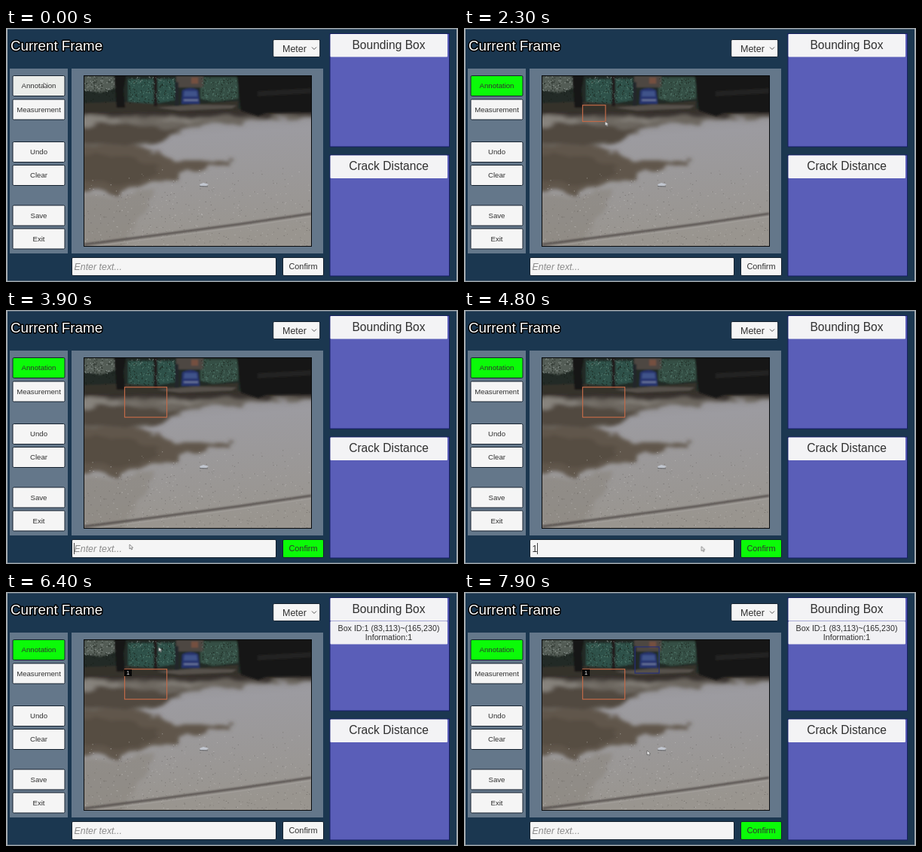
These frames come from a looping animation (600 px wide and 338 px high, 8 s). An HTML page:

```html
<!DOCTYPE html>
<html lang="en">
<head>
<meta charset="utf-8">
<title>Frame annotation</title>
<style>
  html, body { margin: 0; width: 100%; height: 100%; overflow: hidden; background: #1b3750; }
  svg { display: block; width: 100vw; height: 100vh; }
  text { font-family: "Liberation Sans", Arial, sans-serif; fill: #303030; }
  .mid { text-anchor: middle; }
  .btn { fill: #f5f5f5; stroke: #14212e; stroke-width: 1; }
  .head { font-size: 15.6px; }
  .entry { font-size: 10.7px; }
  .drag { fill: none; stroke-width: 1.2; }

  #cursor, #first, #second { animation: 8s linear infinite; }
  #cursor { animation-name: move; }
  #first { animation-name: drag-first; }
  #second { animation-name: drag-second; }
  #annotate, #confirm, #hint, #typed, #caret, .result { animation: 8s step-end infinite; }
  #annotate { animation-name: annotate; }
  #confirm { animation-name: confirm; }
  #hint { animation-name: hint; }
  #typed { animation-name: typed; }
  #caret { animation-name: caret; }
  .result { animation-name: result; }

  @keyframes move {
    0%, 4.5% { transform: translate(50px, 73px); }
    11% { transform: translate(150px, 102px); }
    17%, 23.75% { transform: translate(157px, 103px); }
    33%, 34.5% { transform: translate(213px, 142px); }
    38.75% { transform: translate(176px, 228px); }
    44%, 56% { transform: translate(164px, 312px); }
    62%, 65.5% { transform: translate(390px, 316px); }
    71.5%, 74.5% { transform: translate(66px, 75px); }
    81%, 82.5% { transform: translate(227px, 73px); }
    88.75% { transform: translate(245px, 101px); }
    91%, 93% { transform: translate(259px, 107px); }
    98.75%, 100% { transform: translate(243px, 211px); }
  }
  @keyframes drag-first {
    0%, 23.75% { width: 0; height: 0; }
    33%, 100% { width: 56px; height: 40px; }
  }
  @keyframes drag-second {
    0%, 82.5% { width: 0; height: 0; }
    88.75% { width: 18px; height: 29px; }
    91%, 100% { width: 32px; height: 35px; }
  }
  @keyframes annotate {
    0%, 70% { fill: #ebedea; }
    4.4%, 74%, 100% { fill: #0bfb08; }
    64.5% { fill: #f5f5f5; }
  }
  @keyframes confirm {
    0%, 74% { fill: #f5f5f5; }
    34%, 92.5%, 100% { fill: #0bfb08; }
    64.5% { fill: #e9e9e9; }
  }
  @keyframes hint { 0%, 64.5%, 100% { opacity: 1; } 54% { opacity: 0; } }
  @keyframes typed { 0%, 64.5%, 100% { opacity: 0; } 54% { opacity: 1; } }
  @keyframes caret {
    0%, 52.5%, 61.5%, 100% { opacity: 0; transform: none; }
    46% { opacity: 1; transform: none; }
    54% { opacity: 1; transform: translateX(7px); }
  }
  @keyframes result { 0% { opacity: 0; } 64.5%, 100% { opacity: 1; } }
</style>
</head>
<body>
<svg viewBox="0 0 600 338" preserveAspectRatio="none">
  <defs>
    <clipPath id="view"><rect x="104" y="64" width="301" height="226"/></clipPath>
    <linearGradient id="ground" x1="0" y1="0" x2=".1" y2="1">
      <stop offset=".2" stop-color="#8f8d8f"/>
      <stop offset=".4" stop-color="#9c9ba0"/>
      <stop offset="1" stop-color="#99958f"/>
    </linearGradient>
    <filter id="dapple" x="-10%" y="-10%" width="120%" height="120%">
      <feTurbulence type="fractalNoise" baseFrequency=".03 .09" numOctaves="2" seed="4"/>
      <feDisplacementMap in="SourceGraphic" scale="18" xChannelSelector="R" yChannelSelector="G"/>
      <feGaussianBlur stdDeviation="2.6"/>
    </filter>
    <filter id="haze" x="-20%" y="-20%" width="140%" height="140%"><feGaussianBlur stdDeviation=".9"/></filter>
  </defs>

  <rect width="600" height="338" fill="#a6acb0"/>
  <rect x="2" y="1.5" width="596" height="335" fill="#1b3750"/>
  <rect x="5" y="54" width="77" height="246" fill="#64778a"/>
  <rect x="87" y="54" width="334" height="246" fill="#64778a"/>

  <text x="6" y="29.7" font-size="18.8" style="fill:#fff;stroke:#000;stroke-width:3;paint-order:stroke;stroke-linejoin:round">Current Frame</text>

  <g clip-path="url(#view)">
    <rect x="104" y="64" width="301" height="226" fill="url(#ground)"/>
    <g filter="url(#dapple)">
      <path d="M85 95H425V119L330 123L250 131L222 143L188 158H85Z" fill="#6c665f"/>
      <path d="M85 95H425V115L345 119L300 115L230 118L150 116L85 119Z" fill="#37322d"/>
      <path d="M85 132L150 128L215 133L240 128L222 142L195 153L160 156L85 150Z" fill="#514940"/>
      <path d="M85 156L170 157L202 167L224 177L300 177V185L240 189L222 204L170 212L142 221L85 215Z" fill="#61574c"/>
      <path d="M85 172L150 168L205 182L190 199L145 207L85 201Z" fill="#574d42"/>
      <path d="M85 121L145 121L180 125L85 129Z" fill="#87837d"/>
      <path d="M190 123L290 119L240 126Z" fill="#87837d"/>
      <path d="M85 224L142 226L200 214L150 300H85Z" fill="#8a857f" opacity=".6"/>
    </g>
    <g filter="url(#haze)">
      <path d="M100 60H315V108H100Z" fill="#222b26"/>
      <path d="M104 64H145V80L125 86L104 82Z" fill="#525c55"/>
      <path d="M162 68H224V96L195 101L162 98Z" fill="#2f5149"/>
      <path d="M258 66H308V94L275 98L258 94Z" fill="#365044"/>
      <path d="M226 64H262V79H226Z" fill="#4d4643"/>
      <path d="M246 66H255V74H246Z" fill="#75503f"/>
      <path d="M104 100L150 98L230 103L308 97V110L230 111L104 112Z" fill="#35312c"/>
      <path d="M200 106L250 102L306 103L300 107L230 110Z" fill="#56514b"/>
      <path d="M143 60H160L156 82L158 106H147Z" fill="#161412"/>
      <path d="M196 60H201V104H196Z" fill="#221f1a"/>
      <path d="M224 72H229V104H224Z" fill="#22282a"/>
      <path d="M234 83Q245 77 255 83L257 101H233Z" fill="#28366f"/>
      <path d="M237 84H253L254 91H236Z" fill="#40538a"/>
      <path d="M236 95H255V97H236Z" fill="#6d789f"/>
      <path d="M306 60H410V112L345 113L335 117L312 110Z" fill="#151413"/>
      <path d="M334 84L405 80V87L334 91Z" fill="#242321"/>
    </g>
    <path id="sky" stroke="#a3aca8" stroke-width="1.5" opacity=".6"/>
    <path id="leaves" stroke="#5f8a7c" stroke-width="1.4" opacity=".6"/>
    <path id="gaps" stroke="#182019" stroke-width="1.6" opacity=".7"/>
    <path id="grit-dark" stroke="#605c59" stroke-width="1" opacity=".5"/>
    <path id="grit-light" stroke="#cbc9c7" stroke-width="1" opacity=".55"/>
    <path d="M104 288L205 275L310 261L405 247" fill="none" stroke="#514b48" stroke-width="2.4" filter="url(#haze)"/>
    <path d="M104 292L205 279L310 265L405 251" fill="none" stroke="#aaa6a2" stroke-width="1.6" opacity=".5"/>
    <path d="M257 208L262 206L269 208L266 210L258 210Z" fill="#c0c5ce"/>
    <path d="M257 210.5L268 211" stroke="#696b70" stroke-width="1"/>
  </g>
  <rect x="103.5" y="63.5" width="302" height="227" fill="none" stroke="#080a0c"/>

  <rect id="first" class="drag" x="157.5" y="102.7" stroke="#c06a48"/>
  <rect id="second" class="drag" x="227" y="73" stroke="#263078"/>
  <g class="result">
    <rect x="157" y="103" width="10" height="9" fill="#080808"/>
    <text class="mid" x="162" y="110" font-size="7" style="fill:#fff">1</text>
  </g>

  <g id="buttons"></g>

  <rect class="btn" x="354.7" y="15.5" width="62" height="23" rx="1.5"/>
  <text x="367" y="31.5" font-size="12.5">Meter</text>
  <path d="M406 25.5L409 28.5L412 25.5" fill="none" stroke="#555" stroke-width="1"/>

  <rect class="btn" x="87.5" y="305.5" width="271" height="24" rx="1.5"/>
  <text id="hint" x="90.5" y="322" font-size="12.4" font-style="italic" style="fill:#8b8b8b">Enter text...</text>
  <text id="typed" x="90.5" y="322" font-size="12.4">1</text>
  <rect id="caret" x="90" y="310" width="1" height="15" fill="#444"/>

  <g id="panels"></g>

  <g class="result">
    <rect x="430.5" y="39" width="155.5" height="30.5" rx="1" fill="#f1f1f4"/>
    <text class="mid entry" x="508" y="52">Box ID:1 (83,113)~(165,230)</text>
    <text class="mid entry" x="508" y="64">Information:1</text>
  </g>

  <path id="cursor" d="M0 0V6L1.5 4.8L2.7 7L3.7 6.4L2.7 4.4L4.6 4.2Z" fill="#f4f4f4" stroke="#4a4a4a" stroke-width=".6"/>
</svg>
<script>
  const $ = id => document.getElementById(id);

  const button = (label, x, y, w, h, size, id = '') => `
    <rect ${id && `id="${id}"`} class="btn" x="${x}" y="${y}" width="${w}" height="${h}" rx="1.5"/>
    <text class="mid" x="${x + w / 2}" y="${y + h / 2 + size * .36}" font-size="${size}">${label}</text>`;

  const side = [['Annotation', 63.5, 'annotate'], ['Measurement', 95], ['Undo', 151.5],
    ['Clear', 182.5], ['Save', 236], ['Exit', 267]];
  $('buttons').innerHTML =
    side.map(([label, y, id]) => button(label, 9, y, 69, 27, 9.6, id)).join('') +
    button('Confirm', 367.5, 305.5, 54, 24, 10.9, 'confirm');

  const panel = (title, y, h) => `
    <rect x="430" y="${y}" width="158.5" height="${h}" fill="#5a5eb8" stroke="#171f62" stroke-width="1"/>
    <rect x="430.5" y="${y + .5}" width="155.5" height="30.5" rx="1" fill="#f3f3f5"/>
    <text class="mid head" x="508" y="${y + 20.4}">${title}</text>`;
  $('panels').innerHTML = panel('Bounding Box', 7.5, 150.5) + panel('Crack Distance', 169, 161);

  // Seeded texture for the pavement and the foliage
  let seed = 11;
  const rand = () => (seed = seed * 16807 % 2147483647) / 2147483647;
  const specks = (count, x, y, w, h, bias = 1) => Array.from({ length: count }, () =>
    `M${(x + rand() * w).toFixed(1)} ${(y + rand() ** bias * h).toFixed(1)}h${(.5 + rand()).toFixed(1)}`).join('');
  const scatter = (id, ...areas) => $(id).setAttribute('d', areas.map(a => specks(...a)).join(''));
  scatter('grit-dark', [260, 104, 185, 301, 105, .6]);
  scatter('grit-light', [220, 104, 180, 301, 110, .6]);
  scatter('sky', [60, 104, 65, 40, 20], [20, 160, 65, 62, 8]);
  scatter('leaves', [130, 162, 66, 62, 32], [90, 259, 66, 46, 30]);
  scatter('gaps', [60, 104, 65, 40, 35], [110, 162, 66, 62, 34], [60, 259, 66, 46, 32]);
</script>
</body>
</html>
```
